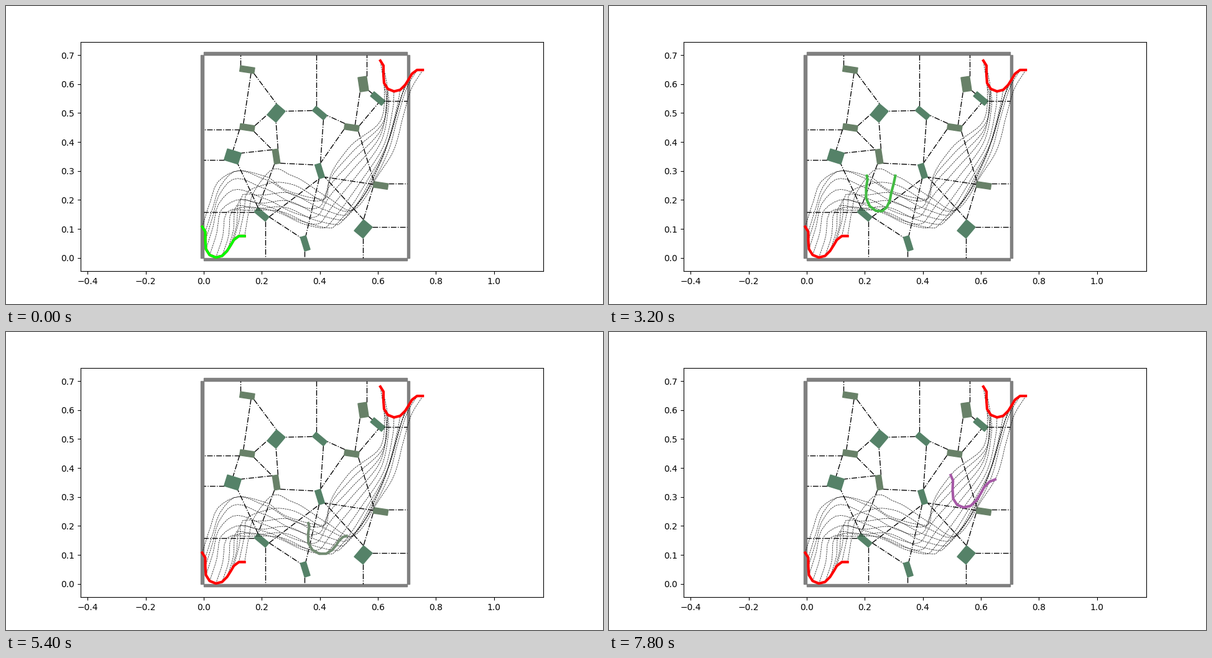
Write a matplotlib script that moves like this. It is 960x480 px and loops after 8 s.

```python
from itertools import combinations

import matplotlib.pyplot as plt
import numpy as np
from matplotlib.animation import FuncAnimation
from matplotlib.patches import Polygon

FRAMES, STEPS = 40, 60           # frames shown, steps of the whole route
SIDE = 0.7
MOSS, PINE = "#688168", "#558268"


def to_data(pixels):
    return (np.asarray(pixels, float) - [317.4, 405.2]) * [1 / 466.67, -1 / 466.67]


def box(cx, cy, w, h, angle=0.0):
    c, s = np.cos(angle), np.sin(angle)
    corners = np.array([(-1, -1), (1, -1), (1, 1), (-1, 1)]) * [w / 2, h / 2]
    return corners @ [[c, s], [-s, c]] + [cx, cy]


def nearest_on(poly, p):
    """Points of each edge of poly nearest to p."""
    edge = np.roll(poly, -1, axis=0) - poly
    along = ((p - poly) * edge).sum(1) / (edge ** 2).sum(1)
    return poly + np.clip(along, 0, 1)[:, None] * edge


def shortest_link(a, b):
    """Shortest segment between two polygons; parallel sides meet halfway."""
    links = [(p, q) for p in a for q in nearest_on(b, p)]
    links += [(q, p) for p in b for q in nearest_on(a, p)]
    links = np.array(links)
    length = np.hypot(*(links[:, 1] - links[:, 0]).T)
    return links[length < length.min() + 1e-7].mean(axis=0)


def is_open(link, others):
    """True if nothing else reaches into the circle spanned by the link."""
    middle = link.mean(axis=0)
    radius = 0.992 * np.hypot(*(link[1] - link[0])) / 2
    return all(np.hypot(*(nearest_on(o, middle) - middle).T).min() > radius for o in others)


# Obstacles: centre, size, angle in radians.
blocks = [
    (.15, .65, .05, .02, -.15), (.15, .45, .05, .02, -.15), (.51, .45, .05, .02, -.15),
    (.61, .25, .05, .02, -.15), (.25, .35, .02, .05, .15), (.55, .60, .03, .05, .15),
    (.40, .50, .05, .02, -.7), (.60, .55, .05, .02, -.7), (.20, .15, .05, .02, -.7),
    (.25, .50, .04, .05, -.7), (.55, .10, .04, .05, -.7), (.10, .35, .05, .04, -.3),
    (.40, .30, .02, .05, .3), (.35, .05, .02, .05, .3),
]
blocks = [box(*b) for b in blocks]
walls = [box(x, SIDE / 2, .01, SIDE) for x in (-.005, SIDE + .005)]
walls += [box(SIDE / 2, y, SIDE, .01) for y in (-.005, SIDE + .005)]
solids = blocks + walls


def passages():
    for i, j in combinations(range(len(solids)), 2):
        if i < len(blocks):
            link = shortest_link(solids[i], solids[j])
            if is_open(link, [s for k, s in enumerate(solids) if k not in (i, j)]):
                yield link


# Rope at rest, and where four of its nodes are at a few steps of the route.
REST = np.array([
    (315, 355), (320, 363), (320, 377), (321, 391), (327, 400.5), (337, 404.5),
    (347, 402), (355, 394), (361, 384.5), (366, 376), (374, 370), (383.2, 370)])
GOAL = REST + [286.5, -267.5]
NODES = np.array([0, 3, 8, 11])
KEYS = {
    4: [(328, 314.5), (333, 353), (371, 349), (391, 325)],
    7: [(340, 283), (341, 319), (376, 311), (398, 299)],
    9: [(357, 270), (356, 301), (398, 316), (416, 273)],
    16: [(414, 273), (413, 309), (451, 313), (460, 273)],
    24: [(455, 298), (464, 333), (504, 336), (519, 309)],
    28: [(495, 309), (492, 340), (537, 344), (556, 329)],
    31: [(516, 307), (505, 333), (547, 339), (578, 307)],
    33: [(518, 284), (514, 315), (564, 321), (590, 285)],
    39: [(549, 230), (553, 268), (597, 260), (620.5, 237)],
    47: [(602, 184), (602, 207), (620, 199), (638, 178)],
    53: [(608, 140), (611, 158), (635, 147), (650, 136)],
}


def bend(nodes):
    """Move the resting rope by a cubic shift that takes its nodes along."""
    shift = np.polyfit(NODES, np.array(nodes) - REST[NODES], 3)
    return REST + np.vander(np.arange(len(REST)), 4) @ shift


def build_route():
    steps = np.array([0, *KEYS, STEPS], float)
    poses = np.array([REST, *map(bend, KEYS.values()), GOAL])
    speed = np.gradient(poses, steps, axis=0)
    route = []
    for s in range(STEPS + 1):
        k = min(np.searchsorted(steps, s, side="right"), len(steps) - 1) - 1
        span = steps[k + 1] - steps[k]
        u = (s - steps[k]) / span
        ease = u * u * (3 - 2 * u)
        route.append(poses[k] * (1 - ease) + poses[k + 1] * ease
                     + span * u * (1 - u) * ((1 - u) * speed[k] - u * speed[k + 1]))
    return to_data(route)


plt.rcParams["font.family"] = "DejaVu Sans"
fig, ax = plt.subplots(figsize=(9.6, 4.8), dpi=100)
fig.subplots_adjust(left=.125, right=.9, bottom=.11, top=.88)
left = (120 - 317.87) / 466.67
ax.set_xlim(left, left + 744 / 466.67)
ax.set_ylim(-.046, .746)
ax.set_xticks(np.arange(-2, 6) * .2)
ax.set_yticks(np.arange(8) * .1)

for wall in walls:
    ax.add_patch(Polygon(wall, color="gray", lw=1, zorder=1))
for i, corners in enumerate(blocks):
    ax.add_patch(Polygon(corners, color=MOSS if i < 6 else PINE, lw=1, zorder=3))
for link in passages():
    ax.plot(*link.T, "k-.", lw=1, zorder=2)

route = build_route()
for i in range(len(REST)):
    ax.plot(*route[:, i].T, "k--", lw=.5, zorder=4)
for pose in (route[0], route[-1]):
    ax.plot(*pose.T, color="red", lw=3, zorder=5)
rope, = ax.plot([], [], lw=3, zorder=6)


def draw(frame):
    t = frame / STEPS
    rope.set_data(*route[frame].T)
    rope.set_color((t, 1 - t, t))
    return rope,


anim = FuncAnimation(fig, draw, frames=FRAMES, interval=200, repeat=True, repeat_delay=0)
plt.show()
```
